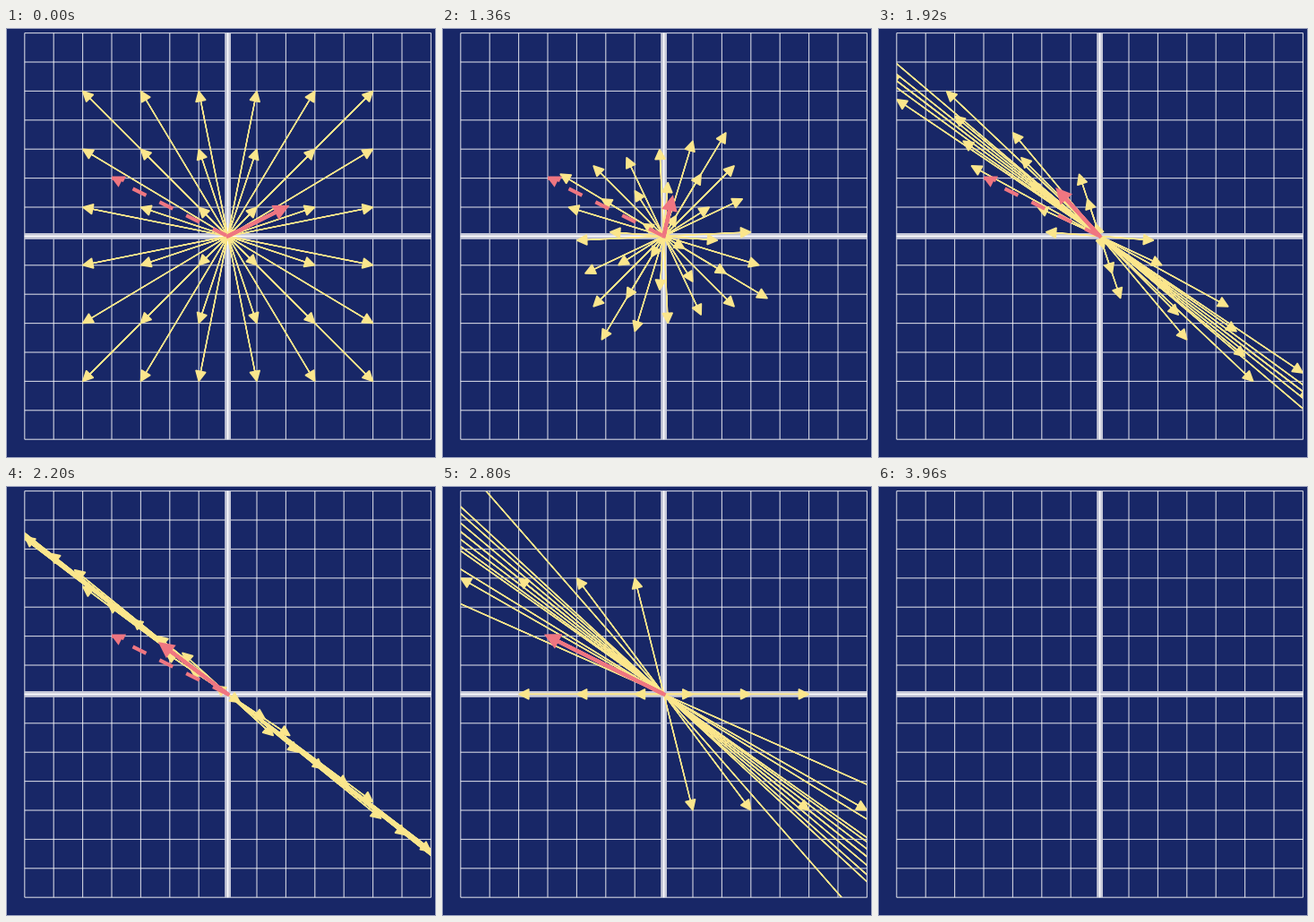
Recreate the animation shown at these times as a matplotlib script. Size 480 by 480 pixels, loop 4 s.

```python
import itertools

import matplotlib.pyplot as plt
import numpy as np
from matplotlib.animation import FuncAnimation
from matplotlib.patches import FancyArrow, PathPatch, Polygon, Rectangle
from matplotlib.path import Path

SIZE, DPI = 480, 100
FRAMES, INTERVAL = 100, 40
TICK = 100                     # ms between poses
START, STEPS = 7, 21           # poses before and during the transformation
HALF = 7                       # the grid runs from -HALF to HALF
HEAD = 0.35                    # arrow head length and width, in grid units

NAVY, YELLOW, PINK, SILVER = "#182767", "#fbe68c", "#ef7681", "#c6c8d8"

MATRIX = np.array([[-3.0, 2.0], [2.0, -2.0]])
VECTOR = np.array([2.0, 1.0])
IMAGE = MATRIX @ VECTOR


def px(n):
    """Pixels to points."""
    return n * 72 / DPI


fig = plt.figure(figsize=(SIZE / DPI, SIZE / DPI), dpi=DPI, facecolor=NAVY)
fig.add_artist(Rectangle((0.5 / SIZE, 0.5 / SIZE), 1 - 1 / SIZE, 1 - 1 / SIZE,
                         fill=False, ec="white", lw=px(1), alpha=0.6, snap=False))

side = 453.6
ax = fig.add_axes([20.8 / SIZE, 1 - (5.6 + side) / SIZE, side / SIZE, side / SIZE])
ax.set(xlim=(-HALF, HALF), ylim=(-HALF, HALF))
ax.axis("off")


def cross(at, color, width, z, alpha=1):
    """One vertical and one horizontal line across the grid."""
    for xs, ys in (((at, at), (-HALF, HALF)), ((-HALF, HALF), (at, at))):
        ax.plot(xs, ys, color=color, lw=px(width), alpha=alpha, zorder=z,
                snap=False, clip_on=False, solid_capstyle="butt")


for n in range(-HALF, HALF + 1):
    cross(n, "white", 1.1, 1, 0.8)
cross(0, SILVER, 6.8, 2)
cross(0, "white", 1.4, 2.1)


def add_arrow(tip, color, lw, z):
    arrow = FancyArrow(0, 0, *tip, width=0.001, head_width=HEAD,
                       head_length=HEAD, length_includes_head=True,
                       fc=color, ec=color, lw=lw, zorder=z)
    return ax.add_patch(arrow)


def add_dashed(tip, color, lw, z):
    along = tip / np.hypot(*tip)
    across = np.array([along[1], -along[0]]) * HEAD / 2
    base = tip - along * HEAD
    head = Polygon([tip, base + across, base - across], fc=color, lw=0, zorder=z)
    outline = PathPatch(Path([tip, base + across, base, (0, 0)]), fill=False,
                        ec=color, lw=lw, ls=(0, (4, 4)), zorder=z)
    return [ax.add_patch(head), ax.add_patch(outline)]


odds = (-5, -3, -1, 1, 3, 5)
points = [np.array(p, float) for p in itertools.product(odds, odds)]
field = [add_arrow(p, YELLOW, 1, 3) for p in points]
dashed = add_dashed(IMAGE, PINK, 3, 4)
main = add_arrow(VECTOR, PINK, 3, 5)

starts = points + [VECTOR]
arrows = field + [main]


def update(i):
    pose = i * INTERVAL // TICK
    s = min(max((pose - START) / STEPS, 0), 1)
    m = (1 - s) * np.eye(2) + s * MATRIX
    shown = i < FRAMES - 1
    for arrow, p in zip(arrows, starts):
        dx, dy = m @ p
        arrow.set_data(dx=dx, dy=dy)
        arrow.set_visible(shown)
    for part in dashed:
        part.set_visible(shown)
    return arrows + dashed


anim = FuncAnimation(fig, update, frames=FRAMES, interval=INTERVAL,
                     init_func=lambda: update(0), repeat=True, repeat_delay=0)
plt.show()
```
